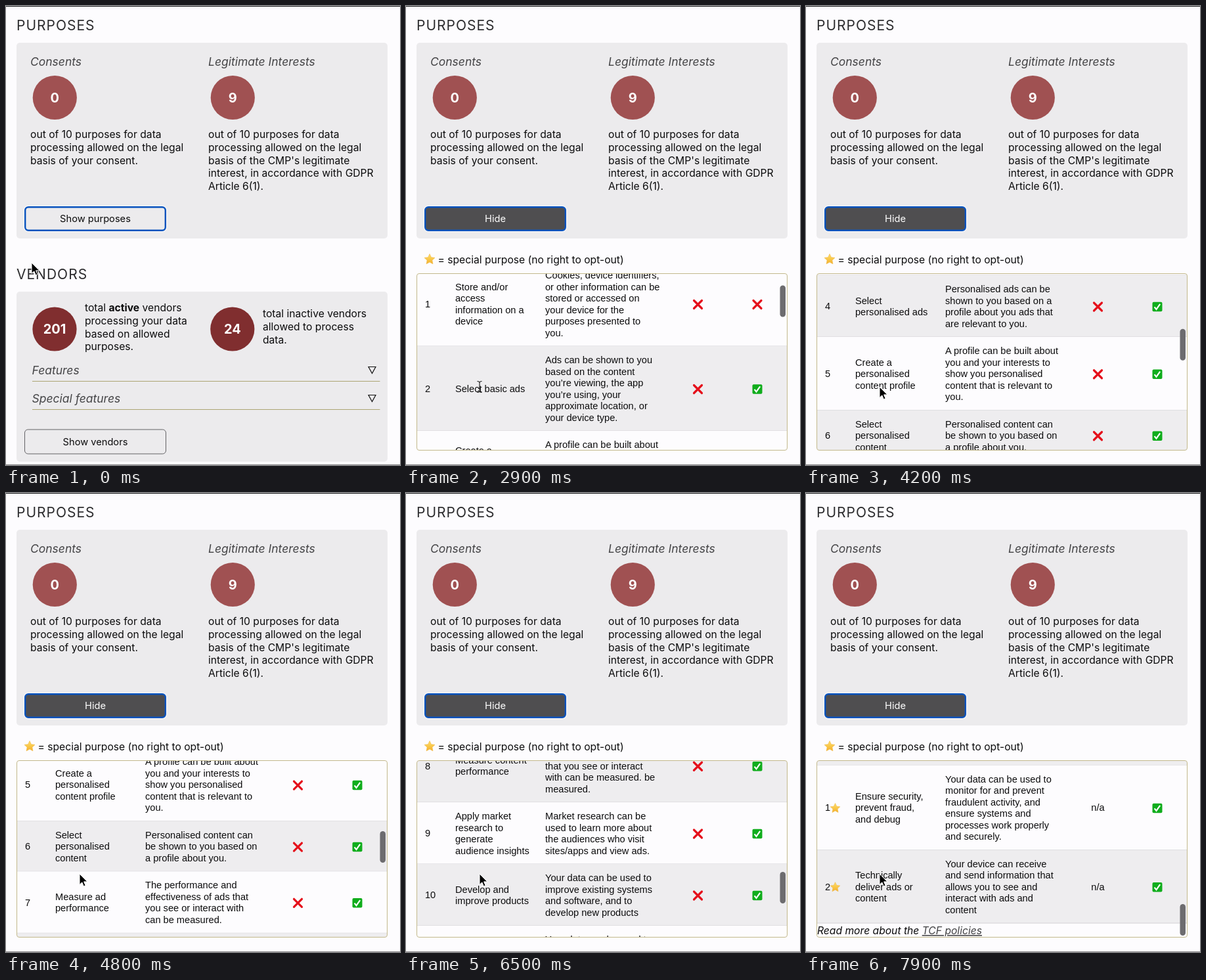
These frames come from a looping animation (600 by 699 pixels, 8 s). An HTML page:

```html
<!DOCTYPE html>
<html lang="en">
<head>
<meta charset="utf-8">
<title>Purposes and vendors</title>
<style>
  html, body { margin: 0; width: 100%; height: 100%; overflow: hidden; background: #fdfcfe; }
  svg { display: block; }
  text { font: 15.65px Inter, sans-serif; fill: #0c0c0d; white-space: pre; }
  .heading { font-size: 21px; letter-spacing: 1px; fill: #2c2c2e; }
  .sub { font-size: 17.5px; font-style: italic; fill: #454547; }
  .count { font-size: 20px; font-weight: 700; fill: #fff; text-anchor: middle; }
  .button { font-size: 14.65px; text-anchor: middle; }
  .light { fill: #fff; }
  .cell { font: 14.6px "Liberation Sans", Arial, sans-serif; }
  .head { font-weight: 700; }
  .mid { text-anchor: middle; }
  .note { font-style: italic; }
  .link { text-decoration: underline; fill: #434345; }
  .bold { font-weight: 700; }
</style>
</head>
<body>
<svg id="stage" width="600" height="699" viewBox="0 0 600 699">
  <defs>
    <clipPath id="window"><rect x="17" y="408" width="563.5" height="268.5" rx="3"/></clipPath>
    <linearGradient id="gold" x2="0" y2="1"><stop stop-color="#ffe06a"/><stop offset="1" stop-color="#f3b02c"/></linearGradient>
    <path id="cross" d="M-6-6 6 6M6-6-6 6" stroke="#e5101b" stroke-width="3.2" stroke-linecap="round"/>
    <g id="check">
      <rect x="-7.5" y="-7.2" width="15" height="14.4" rx="2" fill="#10ad1c"/>
      <path d="M-4.4.4-1.5 3.9 4.2-4.2" fill="none" stroke="#fff" stroke-width="2.1"/>
    </g>
    <path id="star" fill="url(#gold)" stroke="#eeb543" stroke-width=".6" stroke-linejoin="round"/>
    <path id="triangle" d="M-5.5-5H5.5L0 5Z" fill="none" stroke="#111" stroke-width="1.2"/>
  </defs>
  <rect width="600" height="699" fill="#fdfcfe"/>
  <g id="purposes"></g>
  <g id="vendors"></g>
  <g id="details">
    <g id="legend"></g>
    <g clip-path="url(#window)">
      <g id="table"></g>
      <rect id="thumb" x="569.5" width="8.5" height="48" rx="4.25" fill="#6d6c6f"/>
    </g>
    <rect x="16.5" y="407.5" width="564" height="269" rx="3.5" fill="none" stroke="#c3b98c"/>
  </g>
  <path d="M0 .5H600" stroke="#1d1d1f"/>
  <path d="M0 698.5H600" stroke="#8b8b8d"/>
  <g id="pointer">
    <path id="arrow" d="M0 0V16.4l3.8-3.5 2.6 6 2.7-1.2-2.5-5.8h5.2Z" fill="#000" stroke="#fff" stroke-width="1"/>
    <path id="beam" d="M-3.5-8.5Q0-8.5 0-6V6Q0 8.5-3.5 8.5M3.5-8.5Q0-8.5 0-6V6Q0 8.5 3.5 8.5M-2 2.5H2" fill="none" stroke="#111" stroke-width="1.1"/>
  </g>
</svg>
<script>
const $ = id => document.getElementById(id);
const add = (id, ...parts) => { $(id).innerHTML += parts.join(''); };

// Text lines are split on "|"; y is the first baseline.
const text = (x, y, lines, cls = '', step = 19.7) => lines.split('|')
  .map((line, i) => `<text x="${x}" y="${y + i * step}" class="${cls}">${line}</text>`).join('');
const use = (id, x, y, scale = 1) => `<use href="#${id}" transform="translate(${x} ${y}) scale(${scale})"/>`;
const card = (y, h) => `<rect x="16" y="${y}" width="565" height="${h}" rx="5" fill="#ecebed"/>`;
const badge = (x, y, n, color) =>
  `<circle cx="${x}" cy="${y}" r="33.6" fill="${color}"/>` + text(x, y + 7.2, n, 'count');
const button = (y, label, id, stroke, width, rx) =>
  `<rect id="${id}" x="${28 + width / 2}" y="${y + width / 2}" width="${216 - width}" height="${38 - width}"
    rx="${rx}" fill="#ecebed" stroke="${stroke}" stroke-width="${width}"/>` +
  `<text id="${id}Label" class="button" x="136" y="${y + 24.2}">${label}</text>`;

const starPoints = Array.from({length: 10}, (_, i) => {
  const r = i % 2 ? 4.1 : 8.4, a = (i / 5 - .5) * Math.PI;
  return [r * Math.cos(a), r * Math.sin(a)].map(v => v.toFixed(2));
});
$('star').setAttribute('d', 'M' + starPoints.join('L') + 'Z');

add('purposes',
  text(16, 36.6, 'PURPOSES', 'heading'),
  card(56, 298),
  text(37, 90.5, 'Consents', 'sub'),
  text(308, 90.5, 'Legitimate Interests', 'sub'),
  badge(74.3, 139.5, '0', '#a05152'),
  badge(345.3, 139.5, '9', '#a05152'),
  text(37, 201.3, 'out of 10 purposes for data|processing allowed on the legal|basis of your consent.'),
  text(308, 201.3, "out of 10 purposes for data|processing allowed on the legal|basis of the CMP's legitimate|interest, in accordance with GDPR|Article 6(1)."),
  '<rect x="27" y="304" width="218" height="40" rx="6.5" fill="#faf9fb"/>',
  button(305, 'Show purposes', 'toggle', '#0953bd', 2.4, 5));

add('vendors',
  text(16, 415.6, 'VENDORS', 'heading'),
  card(435, 259),
  badge(74, 492, '201', '#802e2f'),
  badge(344.8, 492, '24', '#802e2f'),
  text(120, 465.3, 'total <tspan class="bold">active</tspan> vendors|processing your data|based on allowed|purposes.'),
  text(391, 474.4, 'total inactive vendors|allowed to process|data.'),
  text(39.5, 561.4, 'Features', 'sub'),
  text(39.5, 604.4, 'Special features', 'sub'),
  use('triangle', 557.5, 554.5), use('triangle', 557.5, 597.5),
  '<path d="M40 571.5H569.5M40 614.5H569.5" stroke="#aca573"/>',
  button(644.5, 'Show vendors', 'vendorButton', '#636265', 1, 5));

add('legend', use('star', 36, 386), text(48.5, 391.6, '= special purpose (no right to opt-out)'));

const LINE = 17.5;
const rows = [
  ['1', 'Store and/or|access|information on a|device', 'Cookies, device identifiers,|or other information can be|stored or accessed on|your device for the|purposes presented to|you.'],
  ['2', 'Select basic ads', 'Ads can be shown to you|based on the content|you’re viewing, the app|you’re using, your|approximate location, or|your device type.'],
  ['3', 'Create a|personalised ads|profile', 'A profile can be built about|you and your interests to|show you personalised ads|that are relevant to you.'],
  ['4', 'Select|personalised ads', 'Personalised ads can be|shown to you based on a|profile about you ads that|are relevant to you.'],
  ['5', 'Create a|personalised|content profile', 'A profile can be built about|you and your interests to|show you personalised|content that is relevant to|you.'],
  ['6', 'Select|personalised|content', 'Personalised content can|be shown to you based on|a profile about you.'],
  ['7', 'Measure ad|performance', 'The performance and|effectiveness of ads that|you see or interact with|can be measured.'],
  ['8', 'Measure content|performance', 'The performance and|effectiveness of content|that you see or interact|with can be measured. be|measured.'],
  ['9', 'Apply market|research to|generate|audience insights', 'Market research can be|used to learn more about|the audiences who visit|sites/apps and view ads.'],
  ['10', 'Develop and|improve products', 'Your data can be used to|improve existing systems|and software, and to|develop new products'],
  ['1', 'Ensure security,|prevent fraud,|and debug', 'Your data can be used to|monitor for and prevent|fraudulent activity, and|ensure systems and|processes work properly|and securely.', true],
  ['2', 'Technically|deliver ads or|content', 'Your device can receive|and send information that|allows you to see and|interact with ads and|content', true]
];
const cell = (x, middle, lines, cls = '') =>
  text(x, middle + 5.3 - (lines.split('|').length - 1) * LINE / 2, lines, 'cell ' + cls, LINE);

let rowTop = 467;
const tableRows = rows.map(([id, purpose, description, special], i) => {
  const height = description.split('|').length * LINE + 24;
  const mid = rowTop + height / 2;
  const row = `<rect x="17" y="${rowTop}" width="564" height="${height}" fill="${i % 2 ? '#eeedef' : '#fdfcfe'}"/>` +
    `<path d="M17 ${rowTop + height}h564" stroke="#d2d1d4"/>` +
    cell(29, mid, id) + cell(75, mid, purpose) + cell(212, mid, description) +
    (special ? use('star', 44.5, mid + 1.2, .92) + cell(444.5, mid, 'n/a', 'mid') : use('cross', 444.5, mid + 1)) +
    use(i ? 'check' : 'cross', 535, mid + 1);
  rowTop += height;
  return row;
});
add('table',
  ...tableRows,
  ...[[29, 'ID'], [75, 'Purpose'], [212, 'Description'], [411, 'Consent?'], [502, 'Legit.|Interest?']]
    .map(([x, label]) => cell(x, 438, label, 'head')),
  '<path d="M17 467h564" stroke="#c6bd95" stroke-width="1.6"/>',
  text(17, rowTop + 17, 'Read more about the <tspan class="link">TCF policies</tspan>', 'note'));

// Keys are [time, value]; values are interpolated linearly.
function valueAt(keys, t) {
  const i = keys.findIndex(key => key[0] > t);
  if (i < 0) return keys[keys.length - 1][1];
  if (!i) return keys[0][1];
  const [[t0, a], [t1, b]] = [keys[i - 1], keys[i]];
  return a + (b - a) * (t - t0) / (t1 - t0);
}
const OPEN = 600, SCROLL_START = 2400;
const scrollKeys = [[SCROLL_START, 0], [2900, 78], [4200, 409], [5600, 679], [6500, 835.5], [7900, 1080]];
const xKeys = [[0, 39], [400, 112]];
const yKeys = [[0, 391], [400, 320], [700, 320], [1400, 573], [2200, 573], [2400, 580]];
const beamTimes = [[2700, 3100], [5400, 5900]];
const setVisible = (id, on) => $(id).setAttribute('visibility', on ? 'inherit' : 'hidden');

function draw(now) {
  const t = Math.floor(now % 8000 / 100) * 100;
  const open = t >= OPEN, scroll = valueAt(scrollKeys, t);
  const beam = beamTimes.some(([from, to]) => t >= from && t < to);
  setVisible('vendors', !open);
  setVisible('details', open);
  $('toggle').setAttribute('fill', open ? '#4f4e50' : '#ecebed');
  $('toggleLabel').textContent = open ? 'Hide' : 'Show purposes';
  $('toggleLabel').classList.toggle('light', open);
  $('table').setAttribute('transform', `translate(0 ${-scroll})`);
  $('thumb').setAttribute('y', 410 + scroll * .2);
  setVisible('thumb', open && t > SCROLL_START);
  $('pointer').setAttribute('transform', `translate(${valueAt(xKeys, t)} ${valueAt(yKeys, t)})`);
  setVisible('arrow', !beam);
  setVisible('beam', beam);
}
const startTime = performance.now();
(function loop() {
  draw(performance.now() - startTime);
  requestAnimationFrame(loop);
})();
</script>
</body>
</html>
```
